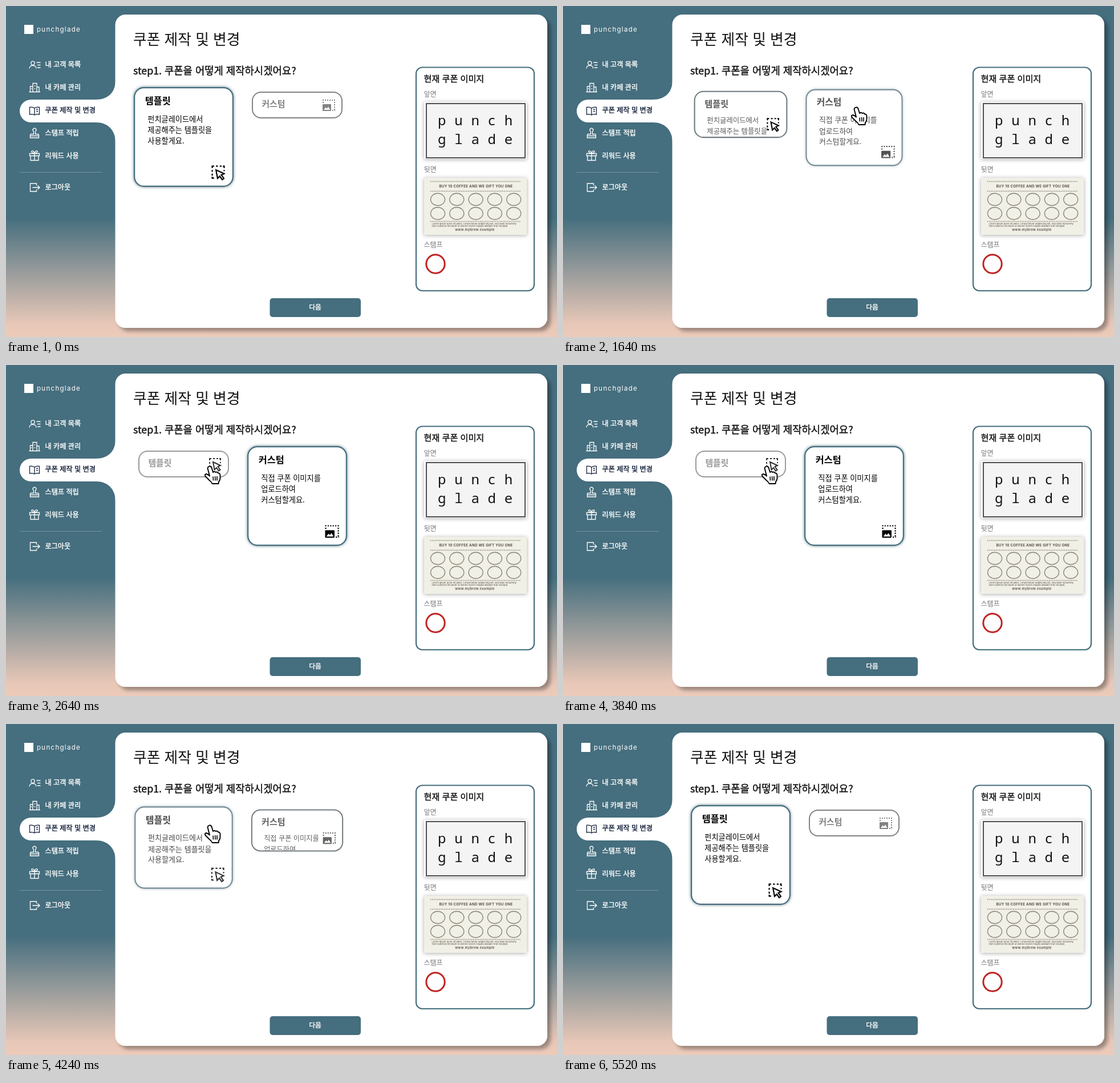
An HTML page for the animation above (5560 ms loop, 966 by 580 pixels).

```html
<!DOCTYPE html>
<html lang="ko">
<head>
<meta charset="utf-8">
<title>쿠폰 제작 및 변경</title>
<style>
  html, body { margin: 0; width: 100%; height: 100%; overflow: hidden; background: #456e7e; }
  body, text { font-family: "Noto Sans CJK KR", "Noto Sans CJK", sans-serif; }
  svg { display: block; overflow: visible; }
  #scene, #cursor { position: absolute; left: 0; top: 0; }
  #scene .latin { font-family: Inter, sans-serif; }
  #scene .mono { font-family: "Noto Sans Mono", monospace; }
  .medium { fill: var(--ink, #111); stroke: var(--ink, #111); stroke-width: .4; }
  .light { --ink: #fff; }
  .navy { --ink: #14213a; }
  .icon { fill: none; stroke: #fff; stroke-width: 1.3; }
  .label { font-size: 12px; fill: #777; }
  .card {
    position: absolute; top: 149.5px; width: 159px; box-sizing: border-box;
    border: 2px solid; border-radius: 16px; overflow: hidden; background: #fff;
  }
  .card b, .card p, .card svg { position: absolute; margin: 0; white-space: nowrap; }
  .card b { left: 16px; top: 8px; font-size: 14.8px; line-height: 22px; }
  .card p { left: 20px; top: 39px; font-size: 12px; line-height: 17.5px; }
  .card svg { right: 10px; bottom: 9px; width: 24px; height: 24px; }
</style>
</head>
<body>
<svg id="scene" width="966" height="580" viewBox="0 0 966 580">
  <defs>
    <linearGradient id="sky" x1="0" y1="0" x2="0" y2="1">
      <stop offset=".64" stop-color="#456e7e"/>
      <stop offset=".96" stop-color="#e7c7b7"/>
      <stop offset="1" stop-color="#edcbbb"/>
    </linearGradient>
    <filter id="drop" x="-10%" y="-10%" width="120%" height="120%">
      <feDropShadow dx="6" dy="6" stdDeviation="3" flood-opacity=".33"/>
    </filter>
    <filter id="halo" x="-10%" y="-15%" width="120%" height="130%">
      <feDropShadow dx="0" dy="1" stdDeviation="3.5" flood-opacity=".33"/>
    </filter>
  </defs>

  <rect width="966" height="580" fill="url(#sky)"/>
  <rect x="191.500" y="15" width="757.500" height="549" rx="18" fill="#fff" filter="url(#drop)"/>
  <path d="M192 130C192 152 178 164 158 164H44a20 20 0 0 0 0 40H158C178 204 192 217 192 239Z" fill="#fff"/>

  <rect x="32" y="33" width="16" height="16" fill="#fff"/>
  <text class="latin" x="54" y="45" font-size="11.500" letter-spacing="1.300" fill="#fff">punchglade</text>

  <g id="menu" font-size="12.150"></g>
  <path d="M24 291.500H168" stroke="#fff" stroke-opacity=".25"/>

  <g class="icon">
    <circle cx="47" cy="100" r="3.200"/>
    <path d="M41 109.500C41 102.500 53 102.500 53 109.500M53.500 99H60.500M55 103.500H60.500M55 108H60.500"/>
    <path d="M40.500 150.500H60M42.500 150V141H47M47 150V135.500H54V150M54 142H58V150M50.500 139V141M50.500 144V146M44.800 144V146"/>
    <path d="M50 179Q46 176.500 41.500 177.500V190Q46 189 50 191Q54 189 58.500 190V177.500Q54 176.500 50 179V191M53 181H56M53 184.500H56" stroke="#14213a"/>
    <path d="M42.500 231V226Q42.500 224.500 44 224.500H48.500V220Q46 217.500 47.500 215.500Q50 213 52.500 215.500Q54 217.500 51.500 220V224.500H56Q57.500 224.500 57.500 226V231ZM42.500 227.500H57.500"/>
    <path d="M41.500 258.500H58.500V262.500H41.500ZM43 262.500V270.500H57V262.500M50 258.500V270.500M50 258C45 258 43.500 254.500 46 253.800Q49 253.500 50 258Q51 253.500 54 253.800C56.500 254.500 55 258 50 258"/>
    <path d="M53.500 314.500V311H42.500V325H53.500V321.500M46.500 318H58.500M55.500 314.500L59 318L55.500 321.500"/>
  </g>

  <text x="223" y="68" font-size="25.750" fill="#111">쿠폰 제작 및 변경</text>
  <text class="medium" x="223" y="120" font-size="17.750">step1. 쿠폰을 어떻게 제작하시겠어요?</text>

  <rect x="719" y="107.500" width="207" height="391.500" rx="11" fill="#fff" stroke="#456e7e" stroke-width="2.200"/>
  <text class="medium" x="732.500" y="132.500" font-size="15.100">현재 쿠폰 이미지</text>
  <text class="label" x="732.500" y="159">앞면</text>
  <text class="label" x="732.500" y="290.500">뒷면</text>
  <text class="label" x="732.500" y="422.500">스탬프</text>

  <rect x="733" y="168" width="180" height="100" fill="#fafafa" filter="url(#halo)"/>
  <rect x="737" y="171" width="173" height="95" fill="#f4f4f5" stroke="#505050" stroke-width="2"/>
  <g font-size="24" letter-spacing="14.800" fill="#111">
    <text class="mono" x="757" y="209">punch</text>
    <text class="mono" x="757" y="242">glade</text>
  </g>

  <rect x="733" y="301" width="180" height="100" fill="#f1f0e7" filter="url(#halo)"/>
  <path d="M744 307.500H903M744 324.500H903M744 377.500H903" stroke="#86806f" stroke-width="1.300" stroke-dasharray="1.500 1.500"/>
  <g id="holes" fill="none" stroke="#8b8678" stroke-width="1.400"></g>
  <g fill="#5a4f45">
    <text class="latin" x="824" y="318" font-size="6.200" font-weight="700" letter-spacing=".3" text-anchor="middle">BUY 10 COFFEE AND WE GIFT YOU ONE</text>
    <text class="latin" x="746.500" y="383" font-size="4.100">Lorem ipsum dolor sit amet, consectetuer adipiscing elit, sed diam nonummy</text>
    <text class="latin" x="746.500" y="387" font-size="4.100">nibh euismod tincidunt ut laoreet dolore magna aliquam erat volutpat.</text>
    <text class="latin" x="822" y="394" font-size="5.700" font-weight="600" letter-spacing=".4" text-anchor="middle">www.mybrew.example</text>
  </g>

  <circle cx="753" cy="452" r="16.200" fill="none" stroke="#bf2422" stroke-width="3"/>

  <rect x="462.500" y="512" width="159.500" height="33" rx="5" fill="#456e7e"/>
  <text class="medium light" x="542" y="532" font-size="11.800" text-anchor="middle">다음</text>
</svg>

<div class="card" id="template" style="left:231.500px">
  <b>템플릿</b>
  <p>펀치글레이드에서<br>제공해주는 템플릿을<br>사용할게요.</p>
  <svg viewBox="0 0 24 24" fill="none" stroke="#000" stroke-width="2">
    <path d="M2 5V2H5M8 2H11M14 2H17M19 2H21V5M2 8V11M2 14V17M2 19V21H5M21 8V10"/>
    <path d="M8 8L21 14L16.500 16L20.500 21.500L18 23.500L14 18L10.500 21.500Z" fill="#fff"/>
  </svg>
</div>
<div class="card" id="custom" style="left:430.500px">
  <b>커스텀</b>
  <p>직접 쿠폰 이미지를<br>업로드하여<br>커스텀할게요.</p>
  <svg viewBox="0 0 24 24" fill="currentColor">
    <path d="M1 3H23M22 6V22M2 6V9M18 21H23" fill="none" stroke="currentColor" stroke-width="2" stroke-dasharray="2 2"/>
    <rect x="1" y="10" width="15" height="12" rx="1"/>
    <path d="M3 20L6.500 15.500L8.500 18L11 14.500L14.500 20Z" fill="#fff"/>
  </svg>
</div>

<svg id="cursor" width="30" height="34" viewBox="0 0 30 34">
  <path d="M8 2Q11 0 13 4L15.500 12Q18 9.500 20 12Q23 10.500 24.500 13.500Q27.500 13 28 17V22Q28 26 25.500 28.500L25 32H14Q13 29 9 26Q6 23 2 19Q0 15 4 15Q7 16 9.500 18.500L6 5Q6 3 8 2Z"
    fill="#fff" stroke="#000" stroke-width="1.900" stroke-linejoin="round"/>
  <path d="M15.500 19.500L16 26.500M19 19L19.500 26.500M22.500 19V26.500" stroke="#000" stroke-width="1.600"/>
</svg>

<script>
const LOOP = 5560, STEP = 40;
const byId = id => document.getElementById(id);
const TEAL = [69, 110, 126], BLACK = [0, 0, 0], GRAY = [130, 130, 130];

const mix = (a, b, p) => a + (b - a) * p;
const mixColor = (a, b, p) => `rgb(${a.map((v, i) => mix(v, b[i], p)).join()})`;
const ramp = (t, start, end) => Math.min(1, Math.max(0, (t - start) / (end - start)));
const smooth = p => p * p * (3 - 2 * p);
const easeOut = p => 1 - (1 - p) ** 3;

const menu = [["내 고객 목록", 102], ["내 카페 관리", 142], ["쿠폰 제작 및 변경", 182],
  ["스탬프 적립", 222], ["리워드 사용", 262], ["로그아웃", 317]];
byId("menu").innerHTML = menu.map(([name, y]) =>
  `<text class="medium ${y === 182 ? "navy" : "light"}" x="68.500" y="${y + 4.5}">${name}</text>`).join("");
byId("holes").innerHTML = Array.from({ length: 10 }, (_, i) =>
  `<ellipse cx="${757 + i % 5 * 33.3}" cy="${i < 5 ? 339 : 363.5}" rx="12.500" ry="10.700"/>`).join("");

// open: 0 collapsed, 1 expanded; hover: 0 to 1
function drawCard(id, open, scale, hover) {
  const { style, children } = byId(id);
  style.height = mix(47, 159, open) + "px";
  style.transform = `scale(${mix(1, 1.1, scale)})`;
  style.opacity = 1 - 0.2 * hover;
  style.borderColor = mixColor(GRAY, TEAL, open);
  style.color = mixColor(GRAY, BLACK, open);
  style.boxShadow = `0 0 5px rgba(60,90,105,${0.8 * open * open})`;
  children[1].style.visibility = open > 0 ? "visible" : "hidden";
}

// Cursor legs: start time, end time, destination
const legs = [
  [600, 960, 504, 164],
  [1200, 1360, 504.5, 176],
  [1920, 2120, 347.5, 176],
  [4400, 4520, 980, 230]
];

function drawCursor(t) {
  let x = 590, y = 590;
  for (const [start, end, toX, toY] of legs) {
    const p = easeOut(ramp(t, start, end));
    x = mix(x, toX, p);
    y = mix(y, toY, p);
  }
  byId("cursor").style.transform = `translate(${x}px, ${y}px)`;
}

function draw(now) {
  const t = Math.floor(now % LOOP / STEP) * STEP;
  const toCustom = easeOut(ramp(t, 1580, 1760));
  const toTemplate = smooth(ramp(t, 3840, 4420));
  const custom = toCustom * (1 - toTemplate);
  const customScale = toCustom * (1 - toTemplate ** 0.6);
  const crossing = ramp(t, 1920, 2120);
  drawCard("template", 1 - custom, 1 - customScale, crossing - ramp(t, 4400, 4600));
  drawCard("custom", custom, customScale, ramp(t, 600, 960) - crossing);
  drawCursor(t);
}

const began = performance.now();
function tick() {
  draw(performance.now() - began);
  requestAnimationFrame(tick);
}
tick();
</script>
</body>
</html>
```
